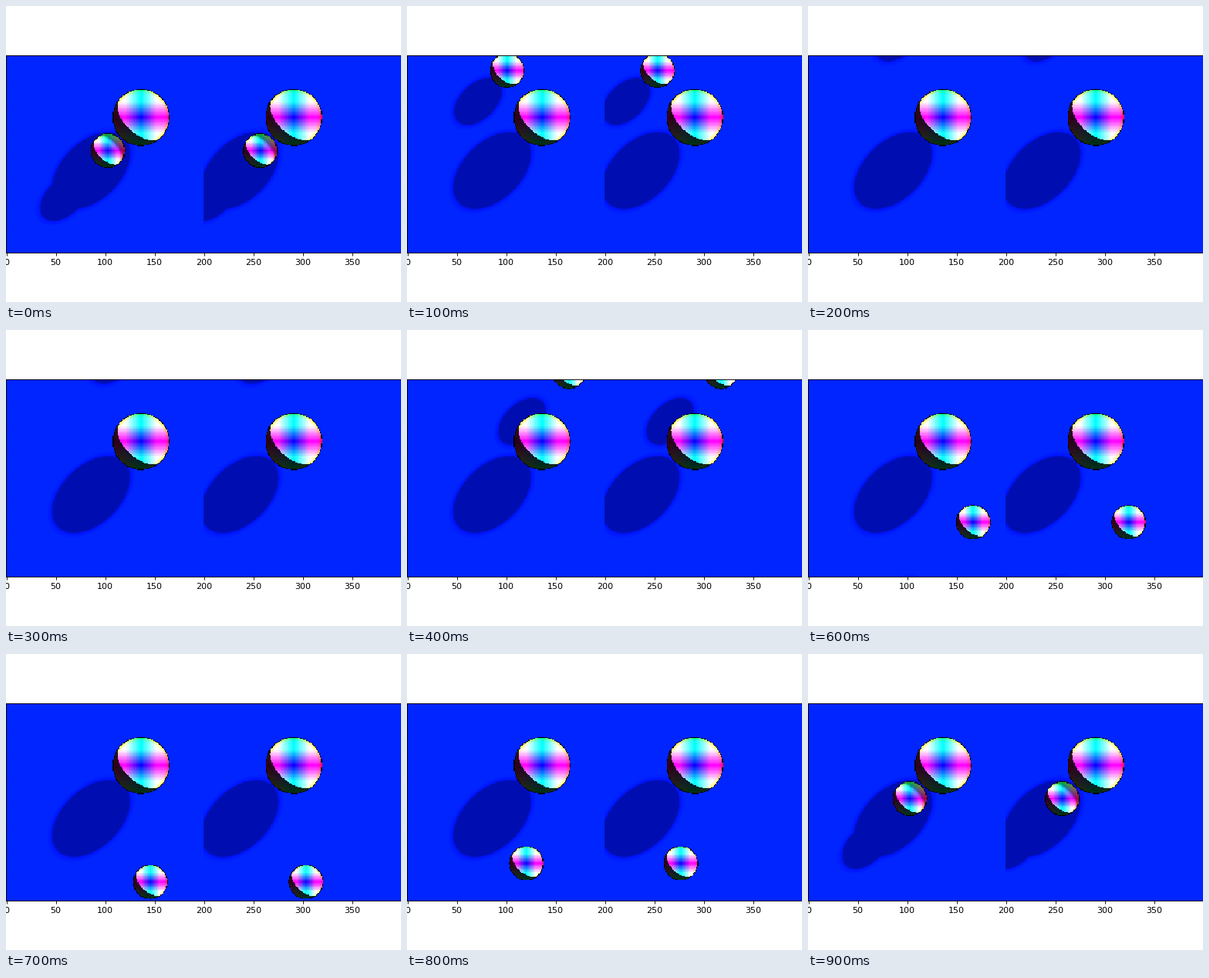
A matplotlib script for the animation above (1000 ms loop, 512x384 px).

```python
import numpy as np
import matplotlib.pyplot as plt
from matplotlib.animation import FuncAnimation

# World units are screen pixels around the big ball: x right, y up, z to the viewer.
SIZE, SCALE, TOP = 200, 1.28, 64
CENTER_X, CENTER_Y = 175, 144.5
FRAMES = 10

TILT, FLOOR_Z = 0.08, -72.5
LIGHT = np.array([0.965, 1.03, 1.0])
LIGHT /= np.linalg.norm(LIGHT)
LIT, CAST, SELF = 1.85, 0.7, 0.2
PENUMBRA = 6
RIM = 0.8

BIG = (np.zeros(3), 36.9)
SMALL_RADIUS = 22.3


def small_ball(frame):
    angle = 2 * np.pi * frame / (FRAMES - 1)
    c, s = np.cos(angle), np.sin(angle)
    return np.array([0.5 - 43.5 * c - 19.5 * s,
                     -43.2 * c + 146 * s,
                     -5.2 * c - 48.5 * s]), SMALL_RADIUS


def parallax(z, eye):
    return eye * (58 - 0.08 * z)


def cast_light(points, casters):
    """Light strength at the points, softened near shadow edges."""
    strength = np.full(points.shape[:-1], LIT)
    for center, radius in casters:
        to_ball = center - points
        along = to_ball @ LIGHT
        gap = np.linalg.norm(to_ball - along[..., None] * LIGHT, axis=-1) - radius
        soft = CAST + (LIT - CAST) * np.clip(gap / PENUMBRA, 0, 1)
        strength = np.where(along > 0, np.minimum(strength, soft), strength)
    return strength


def render_view(eye, balls):
    rows, cols = np.mgrid[:SIZE, :SIZE] + 0.5
    x = cols * SCALE - CENTER_X
    y = CENTER_Y - TOP - rows * SCALE

    floor_z = FLOOR_Z - TILT * y
    floor = np.stack([x + parallax(floor_z, eye), y, floor_z], axis=-1)
    normal = np.array([0, TILT, 1]) / np.hypot(TILT, 1)
    image = cast_light(floor, balls)[..., None] * normal

    # Farther balls first, so nearer ones cover them.
    for ball in sorted(balls, key=lambda b: b[0][2]):
        center, radius = ball
        dx = x + parallax(center[2], eye) - center[0]
        dy = y - center[1]
        dist = np.hypot(dx, dy)
        hit = dist < radius
        dx, dy = dx[hit], dy[hit]
        dz = np.sqrt(radius ** 2 - dx ** 2 - dy ** 2)
        offset = np.stack([dx, dy, dz], axis=-1)
        others = [b for b in balls if b is not ball]
        strength = cast_light(center + offset, others)
        strength[offset @ LIGHT < 0] = SELF
        strength[dist[hit] > radius - RIM] = 0
        image[hit] = strength[:, None] * np.abs(offset) / radius
    return np.clip(image, 0, 1)


def render(frame):
    balls = [BIG, small_ball(frame)]
    return np.hstack([render_view(eye, balls) for eye in (0, 1)])


fig, ax = plt.subplots(figsize=(6.4, 4.8), dpi=80)
fig.subplots_adjust(0, 0, 1, 1)
picture = ax.imshow(render(0), interpolation="nearest")


def update(frame):
    picture.set_data(render(frame))
    return [picture]


anim = FuncAnimation(fig, update, frames=FRAMES, interval=100, repeat=True)
plt.show()
```
